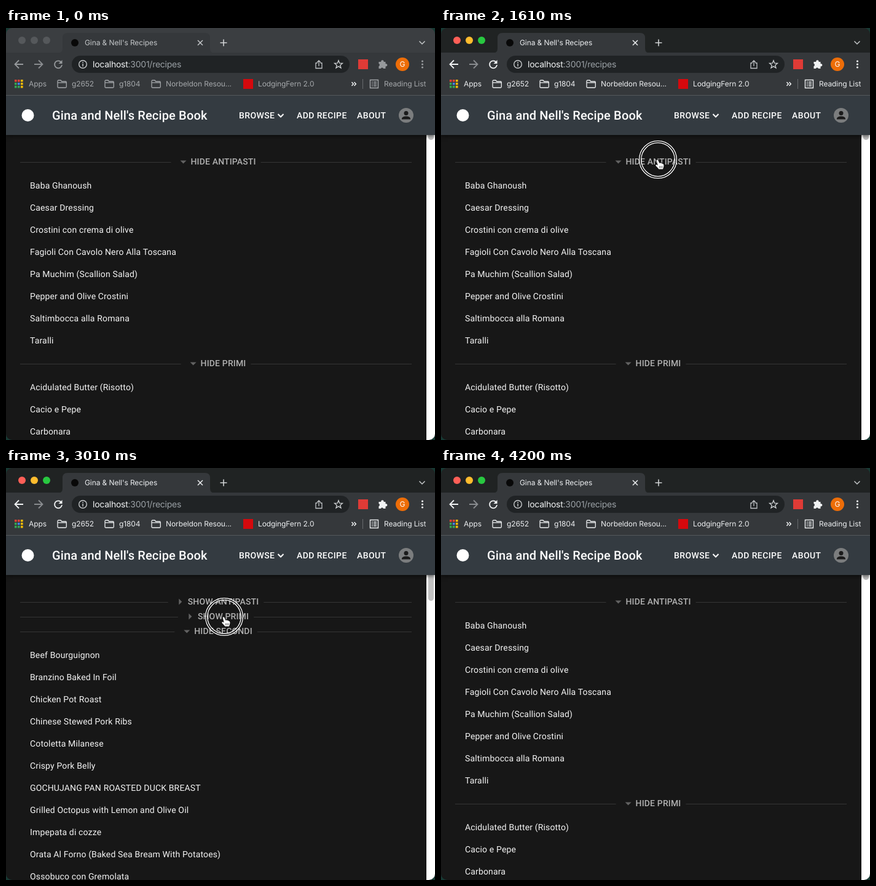
Animation, 698 px wide and 670 px high, one loop 4340 ms. Source, as an HTML page with a canvas:

```html
<!DOCTYPE html>
<html lang="en">
<head>
<meta charset="utf-8">
<title>Recipe book</title>
<style>
html, body { margin: 0; width: 100%; height: 100%; overflow: hidden; background: #171717; }
canvas { display: block; width: 698px; height: 670px; }
</style>
</head>
<body>
<canvas id="stage"></canvas>
<script>
const W = 698, H = 670, LOOP = 4340, STEP = 70;
const ACTIVATE = 910;
const UI = 'Inter, sans-serif', BODY = 'Roboto, sans-serif';

const canvas = document.getElementById('stage');
const ctx = canvas.getContext('2d');
const ratio = window.devicePixelRatio || 1;
canvas.width = W * ratio;
canvas.height = H * ratio;
ctx.textRendering = 'geometricPrecision';

const sections = [
  { name: 'ANTIPASTI', open: t => t < 1680 || t >= 3780, items: [
    'Baba Ghanoush', 'Caesar Dressing', 'Crostini con crema di olive',
    'Fagioli Con Cavolo Nero Alla Toscana', 'Pa Muchim (Scallion Salad)',
    'Pepper and Olive Crostini', 'Saltimbocca alla Romana', 'Taralli'] },
  { name: 'PRIMI', open: t => t < 2450 || t >= 3150, items: [
    'Acidulated Butter (Risotto)', 'Cacio e Pepe', 'Carbonara', 'Fresh Gnocchi',
    'Fresh Pasta Nero', "I Nostri Spaghetti all'Amatriciana",
    'Linguine aglio e olio con pesce spada', 'Orecchiette con cime di rapa',
    'Orecchiette in crema di cime e cozze', 'Pasta con zucca e salsiccia',
    'Pasta fredda pomodoro e mozzarella'] },
  { name: 'SECONDI', open: () => true, items: [
    'Beef Bourguignon', 'Branzino Baked In Foil', 'Chicken Pot Roast',
    'Chinese Stewed Pork Ribs', 'Cotoletta Milanese', 'Crispy Pork Belly',
    'GOCHUJANG PAN ROASTED DUCK BREAST', 'Grilled Octopus with Lemon and Olive Oil',
    'Impepata di cozze', 'Orata Al Forno (Baked Sea Bream With Potatoes)',
    'Ossobuco con Gremolata'] }
];

// Pointer stops: time, x, y
const path = [[280, 318, 690], [630, 343, 243], [700, 342, 241], [840, 353, 214],
  [1750, 353, 214], [2170, 355, 242], [3150, 355, 242], [3500, 359, 214], [3850, 359, 214]];
const presses = [[910, 1050], [1540, 1680], [2310, 2450], [3010, 3150], [3710, 3780]];

function text(s, x, y, font, color, spacing = 0, align = 'left') {
  ctx.font = font;
  ctx.letterSpacing = spacing + 'px';
  ctx.textAlign = align;
  ctx.fillStyle = color;
  ctx.fillText(s, x, y);
}

function rect(x, y, w, h, color, r = 0) {
  ctx.fillStyle = color;
  ctx.beginPath();
  ctx.roundRect(x, y, w, h, r);
  ctx.fill();
}

function disc(x, y, r, color) {
  ctx.fillStyle = color;
  ctx.beginPath();
  ctx.arc(x, y, r, 0, 7);
  ctx.fill();
}

function ring(x, y, r, color, width) {
  ctx.strokeStyle = color;
  ctx.lineWidth = width;
  ctx.beginPath();
  ctx.arc(x, y, r, 0, 7);
  ctx.stroke();
}

function stroke(d, x, y, color, width = 1.6) {
  ctx.save();
  ctx.translate(x, y);
  ctx.strokeStyle = color;
  ctx.lineWidth = width;
  ctx.stroke(new Path2D(d));
  ctx.restore();
}

function fill(d, x, y, color) {
  ctx.save();
  ctx.translate(x, y);
  ctx.fillStyle = color;
  ctx.fill(new Path2D(d));
  ctx.restore();
}

function drawTabs(active) {
  rect(0, 0, W, 41, active ? '#202323' : '#3b3e41');
  const lights = active ? ['#ff5f57', '#febc2e', '#28c840'] : ['#55585b', '#55585b', '#55585b'];
  lights.forEach((c, i) => disc(26 + 20 * i, 20, 6, c));
  fill('M84 41Q92 41 92 33V16Q92 8 100 8H324Q332 8 332 16V33Q332 41 340 41Z', 0, 0, '#35383b');
  disc(112, 24, 6, '#080808');
  const ink = active ? '#eceef0' : '#c3c6c8';
  text("Gina & Nell's Recipes", 128, 28, '12px ' + UI, ink, -0.1);
  stroke('M-4 -4L4 4M4 -4L-4 4', 316, 24, ink, 1.5);
  stroke('M-5.5 0H5.5M0 -5.5V5.5', 354, 24, '#d0d2d4', 1.6);
  stroke('M-4.5 -2L0 2.5L4.5 -2', 677, 23.5, '#c3c6c8', 1.5);
}

function drawToolbar(active) {
  const ink = active ? '#f1f3f4' : '#96999c';
  rect(0, 40, W, 70, '#35383b');
  const arrow = 'M7 0H-6M0 -6.5L-6.5 0L0 6.5';
  stroke(arrow, 21, 59, ink, 1.8);
  ctx.save();
  ctx.translate(53, 59);
  ctx.scale(-1, 1);
  stroke(arrow, 0, 0, '#898c8f', 1.8);
  ctx.restore();
  stroke('M4.6 -3.6A6 6 0 1 0 6 1', 85, 59, ink, 1.8);
  fill('M6.5 -7V-1H0.5Z', 85, 59, ink);

  rect(107, 45, 452, 28, '#202325', 14);
  ring(125, 59, 6.3, '#c6c9cb', 1.4);
  rect(124.3, 58, 1.5, 4.5, '#c6c9cb');
  rect(124.3, 55.3, 1.5, 1.6, '#c6c9cb');
  const font = '14px ' + UI;
  text('localhost', 141, 64, font, '#f1f3f4', -0.25);
  text(':3001/recipes', 141 + ctx.measureText('localhost').width, 64, font, '#9aa0a5', -0.25);
  stroke('M-2.5 -2.5H-5V6H5V-2.5H2.5M0 2.5V-6M-3 -3.5L0 -6.5L3 -3.5', 509, 59.5, '#bfc2c5', 1.3);

  let star = '';
  for (let i = 0; i < 10; i++) {
    const r = i % 2 ? 2.9 : 6.8, a = i * Math.PI / 5 - Math.PI / 2;
    star += (i ? 'L' : 'M') + r * Math.cos(a) + ' ' + r * Math.sin(a);
  }
  stroke(star + 'Z', 541, 59.5, '#cfd2d4', 1.3);
  rect(573, 51, 16, 16, '#df3b36');
  fill('M-6 -4H-2.2A2.2 2.2 0 1 1 2 -4H5V-0.8A2.2 2.2 0 1 1 5 3.4V7H1.5A2.2 2.2 0 0 0 -2.6 7H-6V3.2A2.2 2.2 0 0 0 -6 -1Z',
    612.5, 59, ink);
  disc(645, 59, 11, '#ed6d08');
  text('G', 645, 63.4, '12px ' + UI, '#fff', 0, 'center');
  for (const y of [54, 59, 64]) disc(677.5, y, 1.6, ink);
}

function drawBookmarks(active) {
  const ink = active ? '#eceef0' : '#a4a7aa', font = '12px ' + UI;
  const label = (s, x) => text(s, x, 95, font, ink, -0.1);
  const hues = ['#ea4335', '#ea4335', '#fbbc05', '#34a853', '#4285f4', '#fbbc05', '#34a853', '#34a853', '#fbbc05'];
  hues.forEach((c, i) => rect(14 + i % 3 * 5, 84 + Math.floor(i / 3) * 5, 3.6, 3.6, c));
  label('Apps', 37);
  [[83, 'g2652'], [160, 'g1804'], [236, 'Norbeldon Resou...']].forEach(([x, s]) => {
    stroke('M1 2.5Q1 1 2.5 1H6L7.8 3H14Q15.3 3 15.3 4.5V11.5Q15.3 13 14 13H2.5Q1 13 1 11.5ZM1 4.8H15', x, 84, ink, 1.3);
    label(s, x + 24);
  });
  rect(386, 83, 16, 16, '#d5090d');
  label('LodgingFern 2.0', 410);
  stroke('M-3.5 -3L-0.7 0L-3.5 3M0.5 -3L3.3 0L0.5 3', 566, 91, '#f1f3f4', 1.5);
  rect(580, 83, 1, 16, '#686b6e');
  stroke('M0 0H13V13H0ZM2.5 3.5H4.2M2.5 6.5H4.2M2.5 9.5H4.2M5.5 3.5H10.5M5.5 6.5H10.5M5.5 9.5H10.5', 592.5, 84.5, ink, 1.4);
  label('Reading List', 615);
  rect(0, 109, W, 1, '#55595c');
}

function drawAppBar() {
  ctx.save();
  ctx.shadowColor = 'rgba(0,0,0,.55)';
  ctx.shadowBlur = 6;
  ctx.shadowOffsetY = 2;
  rect(0, 110, W, 64, '#343b41');
  ctx.restore();
  disc(35.5, 142, 10, '#fff');
  text("Gina and Nell's Recipe Book", 75, 149, '500 20px ' + BODY, '#fff', 0.15);
  [['BROWSE', 379], ['ADD RECIPE', 473], ['ABOUT', 571]].forEach(([s, x]) =>
    text(s, x, 147, '500 14px ' + BODY, '#fff', 0.4));
  stroke('M-4.5 -2L0 2.5L4.5 -2', 447, 142, '#fff', 2);
  disc(651, 142, 12, '#7b7d7e');
  disc(651, 138.6, 3.5, '#1b1b1b');
  fill('M-7 6.5V5Q-6 1.5 0 1.5Q6 1.5 7 5V6.5Z', 651, 142, '#1b1b1b');
}

function drawDivider(name, open, y) {
  const s = (open ? 'HIDE ' : 'SHOW ') + name, font = '500 14px ' + BODY;
  ctx.font = font;
  ctx.letterSpacing = '0.15px';
  const w = ctx.measureText(s).width;
  const left = 341.5 - (w + 40) / 2, x = left + 32;
  rect(23, y + 1, left - 23, 1, '#353535');
  rect(x + w + 8, y + 1, 652 - x - w, 1, '#353535');
  fill(open ? 'M-5 -2H5L0 3Z' : 'M-2.5 -5V5L2.5 0Z', x - 12, y + 0.5, '#626262');
  text(s, x, y + 5, font, '#b1b1b1', 0.15);
}

function drawPage(t) {
  rect(0, 110, W, 560, '#171717');
  let y = 217;
  for (const { name, open, items } of sections) {
    const shown = open(t);
    drawDivider(name, shown, y);
    y += 24;
    if (!shown) continue;
    items.forEach((s, i) => text(s, 39, y + 20 + 36 * i, '14px ' + BODY, '#f4f4f4', 0.15));
    y += 16 + 36 * items.length;
    if (y > H) break;
  }
  rect(684, 110, 14, 560, '#fff');
  const end = sections[0].open(t) ? 182 : sections[1].open(t) ? 188 : 216;
  rect(687, 112, 9, end - 112, '#c1c1c1', 4.5);
}

function pointerAt(t) {
  for (let i = 1; i < path.length; i++) {
    const [t0, x0, y0] = path[i - 1], [t1, x1, y1] = path[i];
    if (t < t0 || t >= t1) continue;
    const k = (t - t0) / (t1 - t0), e = k * k * (3 - 2 * k);
    return [x0 + (x1 - x0) * e, y0 + (y1 - y0) * e];
  }
  return null;
}

function outlined(d, x, y, inner, outer, width) {
  ctx.lineJoin = 'round';
  stroke(d, x, y, outer, width);
  fill(d, x, y, inner);
  ctx.lineJoin = 'miter';
}

function drawPointer(t) {
  const p = pointerAt(t);
  if (!p) return;
  const [x, y] = p;
  if (presses.some(([a, b]) => t >= a && t < b)) {
    ring(x, y, 29, 'rgba(0,0,0,.6)', 3);
    ring(x, y, 30.4, '#fff', 1.3);
    ring(x, y, 27.3, '#fff', 1.3);
  }
  if (t < ACTIVATE) {
    outlined('M0.5 1V14.5L3.7 11.6L6 16.6L8.4 15.5L6.2 10.7H10.4Z', x, y, '#111', '#fff', 2);
  } else {
    outlined('M-2.4 1.2Q-1.2 -0.6 0.2 1L2.4 6Q3.8 4.4 5 6Q6.6 5.2 7.4 7Q9.2 6.6 9.4 8.6V11Q9 13 8 15.6H1.4Q-0.6 13 -3.6 10Q-4.2 8 -2.2 8.2L-0.2 9.4Z',
      x, y, '#fff', '#111', 1.6);
    stroke('M2.6 10.5V13.6M4.8 10.5V13.6M7 10.5V13.6', x, y, '#222', 0.8);
  }
}

function draw(t) {
  const active = t >= ACTIVATE;
  ctx.setTransform(ratio, 0, 0, ratio, 0, 0);
  rect(0, 0, W, H, '#173a34');
  ctx.save();
  ctx.beginPath();
  ctx.roundRect(0, 0, W, H, 10);
  ctx.clip();
  drawPage(t);
  drawAppBar();
  drawTabs(active);
  drawToolbar(active);
  drawBookmarks(active);
  drawPointer(t);
  ctx.restore();
}

const start = performance.now();
function tick() {
  const t = (performance.now() - start) % LOOP;
  draw(Math.floor(t / STEP) * STEP);
  requestAnimationFrame(tick);
}
tick();
</script>
</body>
</html>
```
